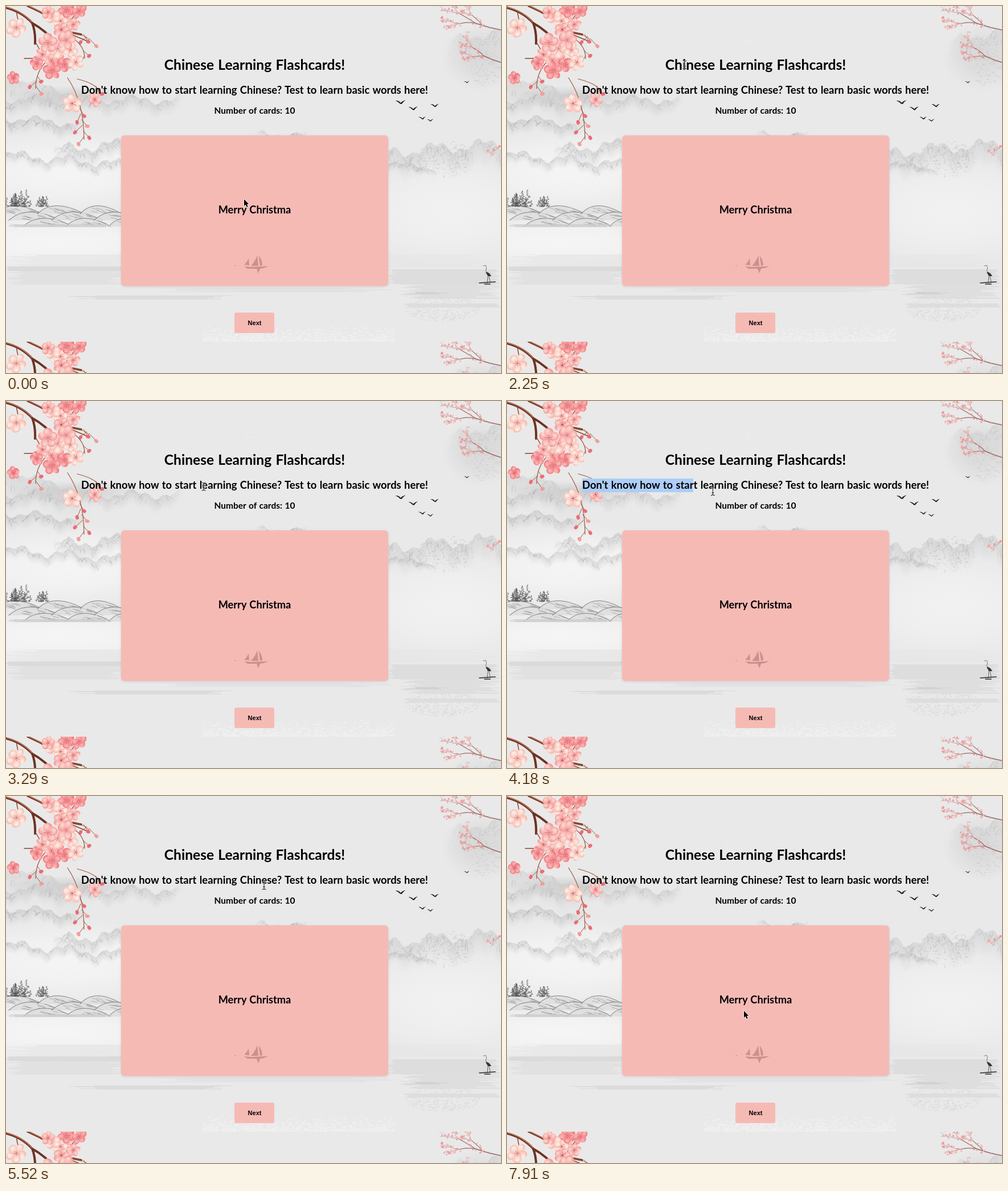
An HTML page with a canvas that plays this animation: 869 by 644 pixels, repeating every 8 s.

```html
<!DOCTYPE html>
<html lang="en">
<head>
<meta charset="utf-8">
<title>Flashcards</title>
<style>
  html, body { margin: 0; width: 100%; height: 100%; overflow: hidden; background: #e9e9e9; }
  canvas, svg { position: absolute; left: 0; top: 0; width: 869px; height: 644px; }
  text { font-family: Lato, "Open Sans", sans-serif; font-weight: 700; text-anchor: middle; word-spacing: .05em; }
  .btn { font-family: "Liberation Sans", Arial, sans-serif; font-size: 11px; }
  .card { filter: drop-shadow(0 1px 2px rgba(0, 0, 0, .1)); }
</style>
</head>
<body>
<canvas id="paper" width="869" height="644"></canvas>
<svg viewBox="0 0 869 644">
  <defs>
    <path id="bar" d="M-3.500-7Q0-7 0-5Q0-7 3.500-7M0-5V5M-3.500 7Q0 7 0 5Q0 7 3.500 7M-2 2.500H2"/>
  </defs>
  <rect id="mark" fill="#a9cdfa" opacity=".93"/>
  <rect class="card" x="202" y="227" width="469" height="264.500" rx="6" fill="#f6bab5"/>
  <g fill="#cb918e">
    <path d="M418 457L430 458 461 456.500 452 460 446 461 443 469 440 461 424 461Z"/>
    <path d="M430 456Q437 449 441 438L443 456ZM443.500 438Q450 446 450 455L446 456ZM418 454Q423 450 426 443L427 455ZM401 455h3v1h-3z"/>
  </g>
  <rect x="401" y="538" width="70" height="36" rx="3" fill="#f6bab5"/>
  <text x="436.500" y="111.500" font-size="24.600">Chinese Learning Flashcards!</text>
  <text x="436.500" y="153.500" font-size="18.400">Don't know how to start learning Chinese? Test to learn basic words here!</text>
  <text x="436.500" y="189" font-size="15.500">Number of cards: 10</text>
  <text x="436.500" y="364" font-size="18.200">Merry Christma</text>
  <text class="btn" x="436.500" y="559.500">Next</text>
  <path id="arrow" d="M0 0V12L2.700 9.500 4.700 14 6.700 13.100 4.800 8.700H8.300Z" stroke="#fff" stroke-width="1.400" paint-order="stroke"/>
  <g id="beam" fill="none">
    <use href="#bar" stroke="#fff" stroke-opacity=".6" stroke-width="2.600"/>
    <use href="#bar" stroke="#333" stroke-width="1.200"/>
  </g>
</svg>
<script>
const $ = id => document.getElementById(id);
const paper = $('paper'), g = paper.getContext('2d');
const WIDTH = 869, TILE = 589;

let seed = 20;
function rnd() {
  seed = (seed + 0x6d2b79f5) | 0;
  let t = Math.imul(seed ^ (seed >>> 15), 1 | seed);
  t = (t + Math.imul(t ^ (t >>> 7), 61 | t)) ^ t;
  return ((t ^ (t >>> 14)) >>> 0) / 4294967296;
}
const spread = n => (rnd() - .5) * n;
const mix = (a, b, u) => a + (b - a) * u;
const ink = (v, a) => `rgba(${v},${v},${v},${a})`;

function line(d, color, width) {
  g.strokeStyle = color;
  g.lineWidth = width;
  g.lineCap = g.lineJoin = 'round';
  g.stroke(new Path2D(d));
}

function oval(x, y, rx, ry, color) {
  g.fillStyle = color;
  g.beginPath();
  g.ellipse(x, y, rx, ry, rnd() * 3, 0, 7);
  g.fill();
}

// Soft oval wash
function wash(x, y, rx, ry, v, a) {
  g.save();
  g.translate(x, y);
  g.scale(rx, ry);
  const fill = g.createRadialGradient(0, 0, 0, 0, 0, 1);
  fill.addColorStop(0, ink(v, a));
  fill.addColorStop(.5, ink(v, a * .7));
  fill.addColorStop(1, ink(v, 0));
  g.fillStyle = fill;
  g.fillRect(-1, -1, 2, 2);
  g.restore();
}

// Dry-brush grain inside an oval
function grain(x, y, rx, ry, v, a, n) {
  g.fillStyle = ink(v, a);
  for (let i = 0; i < n; i++) {
    const turn = rnd() * 6.283, r = Math.sqrt(rnd());
    g.fillRect(Math.round(x + Math.cos(turn) * r * rx), Math.round(y + Math.sin(turn) * r * ry),
      1 + Math.floor(rnd() * 4), 1 + Math.floor(rnd() * 2));
  }
}

// Wavy ridge that fades downwards and at its open ends, with brush strokes
function hill(x0, y0, x1, y1, rise, v, depth, strokes = .35) {
  const phase = rnd() * 6;
  for (let x = x0; x < x1; x += 2) {
    const wave = .65 * Math.sin(x / 27 + phase) ** 2 + .35 * Math.sin(x / 9 + phase * 2) ** 2;
    const y = mix(y0, y1, (x - x0) / (x1 - x0)) - rise * wave + spread(2);
    const a = .75 * Math.min(1, x0 ? (x - x0) / 30 : 1, x1 < WIDTH ? (x1 - x) / 30 : 1);
    const fill = g.createLinearGradient(0, y, 0, y + depth);
    fill.addColorStop(0, ink(v, a));
    fill.addColorStop(.4, ink(v, a * .6));
    fill.addColorStop(1, ink(v, 0));
    g.fillStyle = fill;
    g.fillRect(x, y, 2, depth);
    if (rnd() < strokes) {
      const sy = y + rnd() * depth * .4, dx = spread(12);
      line(`M${x} ${sy}q${dx} 2 ${dx * 1.3} ${3 + rnd() * depth * .22}`, ink(v - 35, a * .6), .6 + rnd());
    }
  }
}

// Flat band of water with ragged ends
function band(x0, x1, y0, y1, v, rag = 25) {
  g.fillStyle = ink(v, .8);
  for (let y = y0; y < y1; y++) {
    const left = x0 + rnd() * rag;
    g.fillRect(left, y, x1 - rnd() * rag - left, 1);
  }
}

function shore() {
  for (let i = 0; i < 9; i++) {
    const x = i * 25 - 20, y = 352 + (i % 3) * 11, w = 70 + rnd() * 25;
    const mound = `M${x} ${y + 13}Q${x + w * .35} ${y - 16} ${x + w} ${y + 13}`;
    g.fillStyle = ink(222, .8);
    g.fill(new Path2D(mound));
    line(mound, ink(110, .8), 1.1);
    for (let k = 0; k < 9; k++) {
      const u = .2 + rnd() * .6;
      line(`M${x + w * u} ${y + 2 + rnd() * 8}q6 1 ${8 + rnd() * 9} ${2 + rnd() * 4}`, ink(125, .55), .9);
    }
  }
  band(0, 188, 383, 388, 205, 15);
  for (let i = 0; i < 24; i++) {
    const x = rnd() * 72, h = 10 + rnd() * (23 - Math.abs(x - 35) * .4);
    for (let k = 0; k < h; k += 1.6) {
      const w = 1 + k * .2;
      line(`M${x + spread(w)} ${352 - h + k}h${spread(w * 2.4)}`, ink(60 + Math.floor(rnd() * 70), .8), 1.4);
    }
  }
}

function bird(x, y, s) {
  g.save();
  g.translate(x, y);
  g.scale(s, s);
  g.fillStyle = '#1c1c1c';
  g.fill(new Path2D('M-10-2Q-4-3 0 2Q3-2 9-3Q4 0 2 4Q-1 5-3 2Q-5 0-10-2Z'));
  g.restore();
}

function crane() {
  line('M838 456L842 455Q845 460 842 464L845 468', '#8b8b8b', 1.2);
  g.fillStyle = '#333';
  g.fill(new Path2D('M842 467Q848 466 852 474L846 474Z'));
  line('M846 474L845 486M848 474L850 485', '#444', .8);
  line('M831 486L859 484M840 488H850', '#282828', 1.6);
}

// Petal colours: rim, middle, heart
const TONES = [
  ['#fdebe3', '#f8c3b7', '#f2978d'],
  ['#fbd3cc', '#f6a5a2', '#ea727b'],
  ['#f9b4b0', '#f28086', '#e25062']
];

function blossom(x, y, r, tone) {
  g.save();
  g.translate(x, y);
  g.rotate(rnd() * 6);
  g.scale(1, .75 + rnd() * .25);
  for (let i = 0; i < 5; i++) {
    g.rotate(Math.PI * .4);
    const fill = g.createRadialGradient(spread(r * .5), -r * .7, r * .1, 0, -r * .35, r * .7);
    TONES[tone].forEach((c, k) => fill.addColorStop(k / 2, c));
    g.fillStyle = fill;
    g.beginPath();
    g.ellipse(0, -r * .55, r * (.36 + rnd() * .14), r * .46, spread(.5), 0, 7);
    g.fill();
    g.strokeStyle = 'rgba(255,240,234,.6)';
    g.lineWidth = .6;
    g.stroke();
  }
  for (let i = 0; i < 7; i++) {
    g.rotate(.9);
    line(`M0 0V${-r * (.2 + rnd() * .25)}`, 'rgba(190,45,60,.75)', .6);
  }
  g.restore();
}

// Blossoms spread evenly over an oval
function cluster(x, y, rx, ry, n, r) {
  for (let i = 0; i < n; i++) {
    const reach = Math.sqrt(i / n), turn = i * 2.4;
    blossom(x + Math.cos(turn) * reach * rx, y + Math.sin(turn) * reach * ry, r * (.8 + rnd() * .35), (i * 2 + n) % 3);
  }
}

// Stem with buds on alternating side twigs
function stem(x0, y0, x1, y1, twigs) {
  line(`M${x0} ${y0}Q${x1} ${mix(y0, y1, .4)} ${x1} ${y1}`, '#a0583f', 1.2);
  for (let i = 1; i <= twigs; i++) {
    const u = mix(.45, 1, i / twigs), side = i % 2 ? 1 : -1;
    const x = mix(x0, x1, Math.sqrt(u)), y = mix(y0, y1, u);
    const bx = x + side * (6 + rnd() * 7), by = y + 4 + rnd() * 6;
    line(`M${x} ${y - 5}L${bx} ${by}`, '#a0583f', 1);
    oval(bx, by, 3, 4, i % 3 ? '#ec6b74' : '#f49c98');
  }
}

function blossomBranch() {
  line('M0 3Q28 10 46 30Q52 45 51 66M46 30Q70 43 88 66', '#6d3323', 4);
  line('M38 0Q58 9 76 19Q92 28 98 43L132 50', '#7a3826', 3.500);
  line('M1 2Q28 9 45 28M40 0Q60 9 76 18', '#c47a58', 1.3);
  line('M18 9L22 30M98 43Q112 30 125 8M52 64L68 92L32 92M98 43L146 63', '#8a4431', 1.4);
  stem(108, 126, 137, 234, 6);
  stem(68, 100, 52, 145, 3);
  stem(98, 43, 146, 62, 3);
  stem(122, 60, 138, 92, 2);
  stem(125, 128, 163, 152, 2);
  cluster(105, 20, 33, 24, 7, 14);
  cluster(89, 89, 42, 34, 11, 16);
  [[18, 38, 19], [74, 11, 13], [13, 126, 12], [116, 171, 18], [156, 164, 14]]
    .forEach(([x, y, r], i) => blossom(x, y, r, i % 3));
}

// Thin forking twig with specks of blossom
function twig(x, y, turn, length, forks) {
  const bend = turn + spread(.5);
  const x1 = x + Math.cos(turn) * length, y1 = y + Math.sin(turn) * length;
  line(`M${x} ${y}Q${x + Math.cos(bend) * length / 2} ${y + Math.sin(bend) * length / 2} ${x1} ${y1}`,
    forks > 1 ? '#8f6c68' : '#b99391', .5 + forks * .35);
  for (let i = 0; i < 4; i++) {
    const u = rnd();
    oval(mix(x, x1, u) + spread(8), mix(y, y1, u) + spread(7), 1 + rnd() * 2, .8 + rnd(), i % 2 ? '#f2b6b4' : '#eb9a9c');
  }
  if (forks) {
    twig(x1, y1, turn + .15 + rnd() * .35, length * .75, forks - 1);
    twig(x1, y1, turn - .15 - rnd() * .4, length * .6, forks - 1);
  }
}

function landscape() {
  g.fillStyle = '#e9e9e9';
  g.fillRect(0, 0, WIDTH, TILE);
  grain(410, 75, 35, 22, 239, .6, 50);
  grain(440, 50, 340, 55, 236, .7, 350);
  wash(110, 290, 220, 75, 246, .9);
  wash(90, 415, 240, 50, 247, .9);
  wash(780, 360, 190, 95, 242, .95);

  hill(0, 132, 150, 168, 16, 214, 60);
  wash(120, 160, 120, 20, 198, .6);
  hill(0, 172, 310, 174, 20, 206, 26);
  hill(0, 205, 140, 216, 18, 202, 24, .5);
  hill(80, 264, 240, 250, 24, 208, 30, .6);
  hill(0, 270, 240, 290, 20, 210, 20, .5);
  hill(435, 232, 530, 232, 14, 190, 10, .6);
  hill(630, 272, WIDTH, 254, 26, 210, 46, .7);
  hill(630, 275, 760, 290, 10, 205, 14, .5);
  grain(775, 268, 45, 32, 190, .4, 170);
  wash(835, 90, 70, 60, 212, .7);
  hill(775, 72, WIDTH, 52, 20, 214, 58);
  grain(838, 95, 34, 45, 198, .45, 200);
  shore();

  band(0, WIDTH, 436, 458, 232, 60);
  band(0, 210, 457, 465, 216, 5);
  band(0, 210, 465, 489, 224, 30);
  band(665, WIDTH, 462, 488, 219, 18);
  band(690, WIDTH, 488, 514, 221, 45);
  band(700, 780, 502, 506, 207, 25);
  band(100, 400, 508, 515, 217, 70);
  band(250, 690, 494, 502, 226, 90);
  band(698, WIDTH, 522, 529, 220, 8);
  grain(765, 530, 66, 24, 220, .7, 450);
  g.fillStyle = ink(241, .8);
  for (let i = 0; i < 1100; i++) {
    g.fillRect(Math.round(345 + rnd() * 335), Math.round(588 - rnd() * rnd() * 30), 1 + Math.floor(rnd() * 5), 2);
  }

  [[693, 168], [715, 179], [753, 174], [731, 196], [745, 200], [809, 133]]
    .forEach(([x, y], i) => bird(x, y, .95 - i * .09));
  crane();
  blossomBranch();
  twig(869, 42, 3.4, 46, 3);
  twig(835, 32, 3.9, 22, 2);
  twig(869, 99, 3.5, 32, 3);
  twig(869, 245, 2.5, 16, 1);
}

landscape();
g.drawImage(paper, 0, 0, WIDTH, 55, 0, TILE, WIDTH, 55);

const LOOP = 8000, STEP = 149.1;

// Text lines and the steps during which each is selected
const LINES = [
  { left: 278, right: 594, top: 88, height: 31, from: 18, to: 20 },
  { left: 132, right: 740, top: 136, height: 24, from: 27, to: 33 },
  { left: 366, right: 507, top: 175, height: 19, from: 42, to: 46 }
];

// Pointer turning points: step, x, y
const PATH = [
  [0, 418, 339], [1, 416, 333], [2, 416, 333], [7, 428, 156], [8, 428, 150], [15, 312, 103],
  [17, 277, 103], [19, 611, 103], [22, 347, 150], [25, 131, 159], [26, 131, 159], [31, 707, 158],
  [33, 736, 158], [37, 453, 157], [40, 358, 184], [41, 358, 184], [42, 550, 184], [43, 568, 182],
  [45, 566, 161], [46, 566, 161], [50, 413, 340], [51, 413, 340], [53, 416, 377]
];

function pointer(step) {
  const i = Math.max(1, PATH.findIndex(p => p[0] >= step));
  const [s0, x0, y0] = PATH[i - 1], [s1, x1, y1] = PATH[i];
  const u = (step - s0) / (s1 - s0);
  return [mix(x0, x1, u), mix(y0, y1, u)];
}

function show(now) {
  const step = Math.floor((now % LOOP) / STEP);
  const [x, y] = pointer(step);
  const overText = LINES.some(l => x > l.left && x < l.right && y >= l.top && y <= l.top + l.height);
  $('arrow').style.display = overText ? 'none' : '';
  $('beam').style.display = overText ? '' : 'none';
  $(overText ? 'beam' : 'arrow').setAttribute('transform', `translate(${x} ${y})`);

  // The highlight trails the pointer a little and stays to the end of the line
  const row = LINES.find(l => step >= l.from && step <= l.to);
  let width = 0;
  if (row) {
    const reach = step > row.from + 4 || step === row.to ? row.right : 0;
    const end = Math.max(pointer(step - .3)[0], step === row.to ? reach : 0);
    width = Math.max(0, Math.min(end, row.right) - row.left);
    $('mark').setAttribute('x', row.left);
    $('mark').setAttribute('y', row.top);
    $('mark').setAttribute('height', row.height);
  }
  $('mark').setAttribute('width', width);
  requestAnimationFrame(show);
}
show(performance.now());
</script>
</body>
</html>
```
